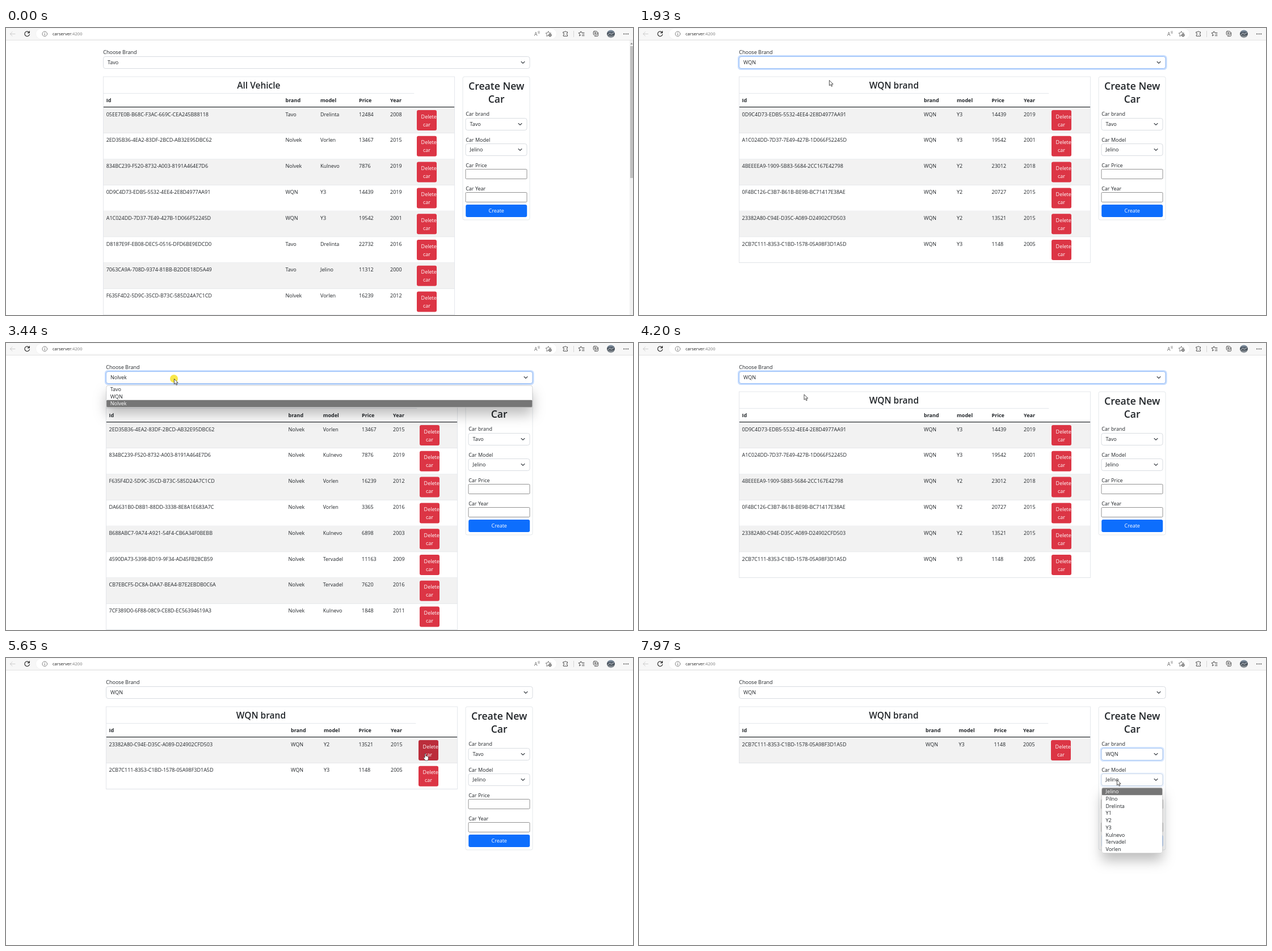
These frames come from a looping animation (1105 by 507 pixels, 8000 ms). An HTML page:

```html
<!DOCTYPE html>
<html lang="en">
<head>
<meta charset="utf-8">
<title>Vehicle list</title>
<style>
  html, body { margin: 0; width: 100%; height: 100%; overflow: hidden; background: #fff; }
  svg { display: block; font: 9px "Open Sans", "Noto Sans", sans-serif; fill: #212529; }
  text { white-space: pre; }
  .icon { fill: none; stroke: #3c3c3c; stroke-width: .9; stroke-linecap: round; stroke-linejoin: round; }
</style>
</head>
<body>
<svg width="1105" height="507" viewBox="0 0 1105 507">
  <defs>
    <filter id="shadow" x="-50%" y="-80%" width="200%" height="320%">
      <feDropShadow dx="0" dy="13" stdDeviation="11" flood-color="#000" flood-opacity=".26"/>
    </filter>
    <linearGradient id="photo" x1="0" y1="0" x2="0" y2="1">
      <stop offset="0" stop-color="#8fa0b2"/>
      <stop offset=".5" stop-color="#3d4650"/>
      <stop offset="1" stop-color="#a5abb0"/>
    </linearGradient>
  </defs>
  <rect width="1105" height="507" fill="#fff"/>
  <g id="page"></g>

  <g id="browser">
    <rect width="1105" height="21.5" fill="#f7f7f7"/>
    <rect y="21" width="1105" height="1" fill="#e2e2e2"/>
    <rect x="52.5" y=".8" width="918" height="19" rx="9.5" fill="#fff" stroke="#ececec" stroke-width=".6"/>
    <path class="icon" d="M16 10.5H7.5M11 6.8L7.3 10.5L11 14.2" style="stroke:#c9c9c9"/>
    <path class="icon" d="M41 8.3A4.3 4.3 0 1 0 41.4 11.4M41.3 5.6V8.6H38.3" style="stroke:#222;stroke-width:1.1"/>
    <circle class="icon" cx="68.3" cy="10.4" r="4.3" style="stroke:#666;stroke-width:.8"/>
    <path class="icon" d="M68.3 10V12.6M68.3 8.1V8.3" style="stroke:#666"/>
    <text x="82" y="13.2" font-size="7.6" fill="#222">carserver<tspan fill="#777">:4200</tspan></text>
    <text x="931" y="13.6" font-size="8.6" fill="#666">A</text>
    <path class="icon" d="M937.6 6.2Q939 7.6 937.8 9.2M939.3 5.2Q941 7.6 939.5 10" style="stroke:#666;stroke-width:.7"/>
    <path class="icon" d="M955.6 13.2L952.9 14.7L953.4 11.4L951.1 9.1L954.3 8.6L955.8 5.7L957.3 8.6L960.4 9" style="stroke:#666"/>
    <circle cx="958.8" cy="12.6" r="2.7" fill="#555"/>
    <path d="M957.2 12.6H960.4M958.8 11V14.2" stroke="#fff" stroke-width=".8"/>
    <path class="icon" d="M982.3 7H984.4A1.5 1.5 0 0 1 987.3 7H989.5V9.2A1.4 1.4 0 0 0 989.5 12V14.3H982.3V12A1.4 1.4 0 0 0 982.3 9.2Z"/>
    <path d="M1000.5 5V16" stroke="#d5d5d5"/>
    <path class="icon" d="M1013 12.3L1010.5 14L1011.2 11L1009 8.8L1012 8.4L1013.3 5.8L1014.6 8.4H1019M1016 11H1019M1015.5 13.6H1019"/>
    <rect class="icon" x="1035.2" y="5.7" width="6.6" height="6.6" rx="1.5"/>
    <path class="icon" d="M1043.6 8V12.6Q1043.6 14.6 1041.6 14.6H1037.4M1038.5 7.5V10.6M1037 9H1040"/>
    <circle cx="1066" cy="10.4" r="7" fill="url(#photo)"/>
    <path d="M1060.3 12L1064 9.4L1067 10.8L1071.5 8.6" fill="none" stroke="#d5dae0"/>
    <g fill="#333"><circle cx="1089.2" cy="10.5" r=".9"/><circle cx="1092.7" cy="10.5" r=".9"/><circle cx="1096.2" cy="10.5" r=".9"/></g>
  </g>

  <g id="menu"></g>
  <g id="pointer">
    <circle id="click" r="7" fill="#f7e436" opacity=".9"/>
    <path id="arrow" d="M.4 .4V9.8L2.6 7.8L4.1 11.2L5.7 10.5L4.2 7.2H7.1Z" fill="#fff" stroke="#222" stroke-width=".8"/>
    <path id="hand" d="M-.9 7V.9Q-.9 0 0 0T.9 .9V4.2Q2.3 3.7 2.6 4.7Q3.9 4.3 4.2 5.3Q5.3 5.1 5.4 6.2V8.6Q5.3 10.4 4.3 12H-.2Q-1.6 9.6 -3.2 7.6Q-2.7 6.2 -.9 7Z" fill="#fff" stroke="#222" stroke-width=".7"/>
  </g>
</svg>
<script>
const LOOP = 8000;
const $ = id => document.getElementById(id);

const BRANDS = ['Tavo', 'WQN', 'Nolvek'];
const MODELS = ['Jelino', 'Pilno', 'Drelinta', 'Y1', 'Y2', 'Y3', 'Kulnevo', 'Tervadel', 'Vorlen'];
// id, brand, model, price, year
const CARS = `05EE7E0B-B68C-F3AC-669C-CEA245B88118 Tavo Drelinta 12484 2008
2ED35B36-4EA2-83DF-2BCD-AB32E95DBC62 Nolvek Vorlen 13467 2015
834BC239-F520-8732-A003-8191A464E7D6 Nolvek Kulnevo 7876 2019
0D9C4D73-EDB5-5532-4EE4-2E8D4977AA91 WQN Y3 14439 2019
A1C024DD-7D37-7E49-427B-1D066F52245D WQN Y3 19542 2001
D8187E9F-EB08-DEC5-0516-DFD6BE9EDCD0 Tavo Drelinta 22732 2016
7063CA9A-708D-9374-81BB-B2DDE18D5A49 Tavo Jelino 11312 2000
F635F4D2-5D9C-35CD-B73C-585D24A7C1CD Nolvek Vorlen 16239 2012
4BEEEEA9-1909-5B83-5684-2CC167E42798 WQN Y2 23012 2018
0F4BC126-C3B7-B61B-BE9B-BC71417E38AE WQN Y2 20727 2015
23382A80-C94E-D35C-A089-D24902CFD503 WQN Y2 13521 2015
2CB7C111-8353-C1BD-1578-05A98F3D1A5D WQN Y3 1148 2005
DA6631B0-D8B1-88DD-3338-8E8A1E683A7C Nolvek Vorlen 3365 2016
B688ABC7-9A74-A921-54F4-CB6A34F0BEBB Nolvek Kulnevo 6898 2003
4590DA73-5398-BD19-9F34-AD45FB28CB59 Nolvek Tervadel 11163 2009
CB7EBCF5-DC8A-DAA7-BEA4-B7E2EBDB0C6A Nolvek Tervadel 7620 2016
7CF389D0-6F88-08C9-CE8D-EC56394619A3 Nolvek Kulnevo 1848 2011`.split('\n').map(s => s.split(' '));
const ofBrand = b => CARS.filter(c => c[1] === b);

// Text columns, then the left edge of the delete button
const COLS = {
  all: [176.7, 492.5, 554, 622, 677, 724],
  wqn: [181.5, 502, 560, 621.5, 678, 727],
  nolvek: [181.5, 497.5, 558.7, 627, 682, 729],
  last: [181.5, 505, 563.5, 625.5, 677, 726]
};
const ROW = 45.8, TOP = 140.2, OPT = 12.75;

// Pointer path: time, x, y
const PATH = [
  [380, 1058, 426], [520, 978, 286], [720, 978, 286], [1200, 378, 57], [1480, 378, 57],
  [1790, 335, 92], [1990, 335, 92], [2210, 300, 68], [2280, 300, 68], [2620, 302, 104],
  [2890, 302, 104], [3400, 296, 63], [3510, 296, 63], [3580, 294, 75], [3650, 294, 77],
  [3920, 290.6, 90.5], [4300, 290.6, 90.5], [4880, 739, 169], [6180, 739, 169], [6740, 845, 173],
  [6900, 845, 173], [7150, 843, 200], [7420, 843, 200], [7830, 842, 215], [8000, 842, 215]
];
const CLICKS = [1410, 1790, 2210, 2820, 3440, 4120, 4950, 5130, 5320, 5510, 6050, 6740, 7350, 7870];
const DELETES = [5020, 5200, 5390, 5580, 6120];

const within = (t, a, b) => t >= a && t < b;
const clamp = v => Math.max(0, Math.min(1, v));
const fade = (t, a, b) => +(clamp((t - a) / 150) - clamp((t - b) / 150)).toFixed(2);

function pointerAt(t) {
  const i = PATH.findIndex(p => p[0] > t);
  if (i < 1) return PATH[i < 0 ? PATH.length - 1 : 0].slice(1);
  const [a, b] = [PATH[i - 1], PATH[i]];
  const u = (t - a[0]) / (b[0] - a[0]), e = u * u * (3 - 2 * u);
  return [a[1] + (b[1] - a[1]) * e, a[2] + (b[2] - a[2]) * e];
}

// y is the middle of the capitals
const text = (x, y, s, more = '') => `<text x="${x}" y="${y + 3.2}" ${more}>${s}</text>`;
const rect = (x, y, w, h, fill, more = '') =>
  `<rect x="${x}" y="${y}" width="${w}" height="${h}" fill="${fill}" ${more}/>`;
const mid = 'text-anchor="middle" ';

function select(x, y, w, label, focus) {
  const ring = focus ? rect(x - 1.4, y - 1.4, w + 2.8, 23.8, 'none',
    `rx="4.5" stroke="#0d6efd" stroke-width="2.3" stroke-opacity="${.24 * focus}"`) : '';
  const blue = focus ? rect(x, y, w, 21, 'none',
    `rx="3.5" stroke="#86b7fe" stroke-width=".8" stroke-opacity="${focus}"`) : '';
  const cx = x + w - 12, cy = y + 9;
  return ring + rect(x, y, w, 21, '#fff', 'rx="3.5" stroke="#ced4da" stroke-width=".8"') + blue +
    text(x + 7.5, y + 10.5, label) +
    `<path d="M${cx - 2.9} ${cy}l2.9 2.9l2.9 -2.9" fill="none" stroke="#343a40" stroke-width="1.1" stroke-linecap="round" stroke-linejoin="round"/>`;
}

function table(cols, rows, title, left, tall, hover) {
  const width = 619, bx = cols[5], lineEnd = bx - 4.7;
  const bottom = tall ? 520.5 : Math.round(TOP + rows.length * ROW) - .5;
  let s = '';
  rows.forEach((car, i) => {
    const y = TOP + i * ROW;
    if (i % 2 === 0) s += rect(left, y, width, ROW, '#f2f2f2');
    s += rect(left, y + ROW - .6, width, .6, '#dee2e6');
    s += car.map((v, k) => text(cols[k], y + 12.1, v)).join('');
    s += rect(bx, y + 4.8, 35, 36, i === hover ? '#bb2d3b' : '#dc3545', 'rx="3"');
    s += text(bx + 7.6, y + 16.2, 'Delete', 'fill="#fff"') +
      text(bx + 17.5, y + 30.1, 'car', mid + 'fill="#fff"');
  });
  s += text((left + lineEnd) / 2, 104.2, title, mid + 'font-size="15.5" font-weight="600"');
  s += rect(left, 115, lineEnd - left, .8, '#dee2e6');
  s += ['Id', 'brand', 'model', 'Price', 'Year']
    .map((h, k) => text(cols[k], 128, h, 'font-weight="700"')).join('');
  s += rect(left, 139, width, 1.2, '#212529');
  return s + rect(left, 86, width, bottom - 86, 'none', 'stroke="#dee2e6" stroke-width=".8"');
}

function form(x, brand, brandFocus, modelFocus) {
  const big = mid + 'font-size="17.6" font-weight="600"';
  const input = y => rect(x + 5, y, 108, 17, '#fff', 'rx="1.5" stroke="#767676" stroke-width=".8"');
  return rect(x, 86, 118, 253, '#fff', 'rx="3" stroke="#dee2e6" stroke-width=".8"') +
    text(x + 59.2, 106, 'Create New', big) + text(x + 59.2, 128.3, 'Car', big) +
    text(x + 5.2, 152, 'Car brand') + select(x + 5, 159.5, 108, brand, brandFocus) +
    text(x + 5.2, 197.5, 'Car Model') + select(x + 5, 204.5, 108, MODELS[0], modelFocus) +
    text(x + 5.2, 243, 'Car Price') + input(249.5) +
    text(x + 5.2, 283.5, 'Car Year') + input(290.5) +
    rect(x + 5.2, 312, 108, 22, '#0d6efd', 'rx="3"') +
    text(x + 59.2, 323.2, 'Create', mid + 'fill="#fff"');
}

function menu(x, y, w, items, chosen, py) {
  const over = Math.floor((py - y - .5) / OPT);
  const on = over >= 0 && over < items.length ? over : chosen;
  const h = items.length * OPT + .6;
  return rect(x, y, w, h, '#fff', 'rx="3.5" filter="url(#shadow)"') +
    items.map((s, i) => (i === on ? rect(x + .3, y + .3 + i * OPT, w - .6, OPT, '#767676', 'rx="1.5"') : '') +
      text(x + 7, y + 6.7 + i * OPT, s, i === on ? 'fill="#fff"' : '')).join('') +
    rect(x, y, w, h, 'none', 'rx="3.5" stroke="#b9b9b9" stroke-width=".6"');
}

const scrollbar = rect(1099, 22, 6, 485, '#f1f1f1') + rect(1100, 32, 5, 233, '#c1c1c1') +
  '<path d="M1100.4 29l2.1 -3l2.1 3z" fill="#8a8a8a"/>';

const shown = {};
function put(id, html) {
  if (shown[id] !== html) $(id).innerHTML = shown[id] = html;
}

function render(t) {
  const [px, py] = pointerAt(t);
  const all = t < 1860, nolvek = within(t, 2890, 4190);
  const gone = DELETES.filter(d => t >= d).length;
  const view = all ? 'all' : nolvek ? 'nolvek' : gone === 5 ? 'last' : 'wqn';
  const pick = all ? 0 : nolvek ? 2 : 1;
  const rows = all ? CARS.slice(0, 8) : ofBrand(BRANDS[pick]).slice(gone);
  const left = all ? 171.5 : 176.5, formX = left + 633.5;
  const cols = COLS[view];

  const r = (py - TOP) / ROW, i = Math.floor(r), dy = (r - i) * ROW;
  const overButton = t >= 380 && i >= 0 && i < rows.length && within(px, cols[5], cols[5] + 35) && within(dy, 4.8, 40.8);
  const formPick = t < 7420 ? 0 : 1;

  put('page', text(left - .2, 43, 'Choose Brand') +
    select(left, 50.5, 751.5, BRANDS[pick], fade(t, 1410, 4950)) +
    table(cols, rows, all ? 'All Vehicle' : BRANDS[pick] + ' brand', left, all, overButton ? i : -1) +
    form(formX, BRANDS[formPick], fade(t, 6740, 7930), fade(t, 7930, LOOP)) +
    (all ? scrollbar : ''));

  const brandOpen = within(t, 1480, 1860) || within(t, 2280, 2890) || within(t, 3440, 4190);
  put('menu', brandOpen ? menu(left + .3, 75, 751, BRANDS, pick, py)
    : within(t, 6810, 7420) ? menu(formX + 5.5, 184, 107, BRANDS, 0, py)
    : t >= 7960 ? menu(formX + 5.5, 229.3, 107, MODELS, 0, py) : '');

  const show = (id, on) => $(id).setAttribute('visibility', on ? 'visible' : 'hidden');
  $('pointer').setAttribute('transform', `translate(${px.toFixed(2)} ${py.toFixed(2)})`);
  show('arrow', t >= 380 && !overButton);
  show('hand', overButton);
  show('click', CLICKS.some(c => within(t, c, c + 70)));
}

const start = performance.now();
function tick() {
  render((performance.now() - start) % LOOP);
  requestAnimationFrame(tick);
}
tick();
</script>
</body>
</html>
```
